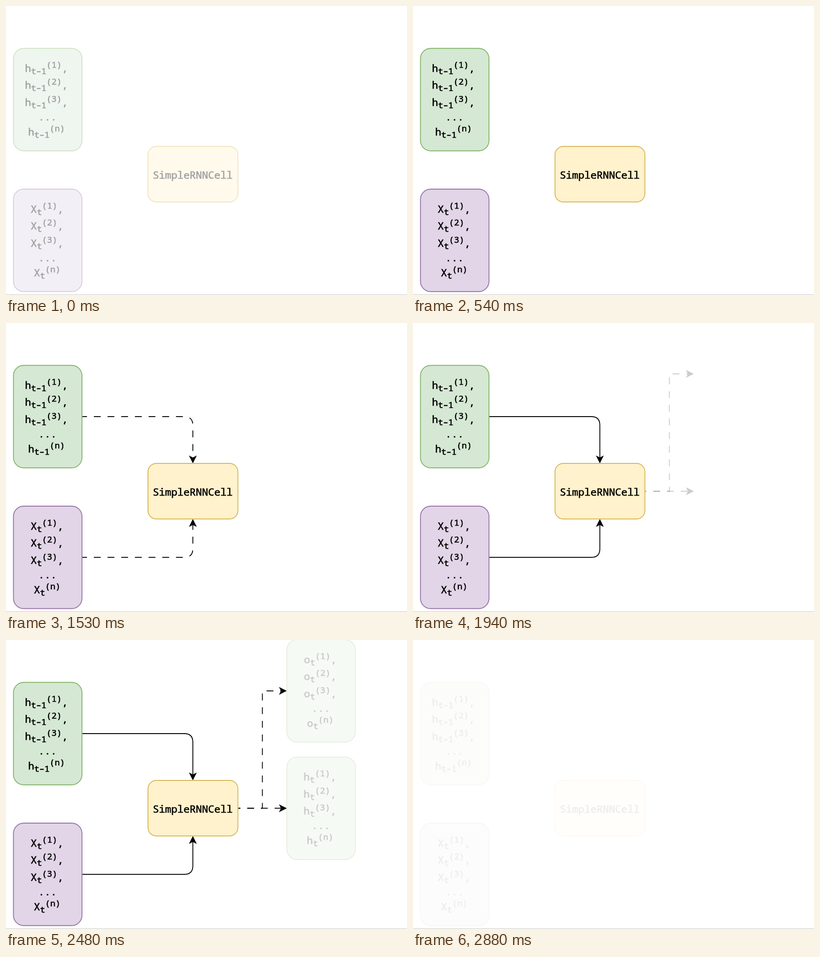
Recreate the animation shown at these times as an HTML page. Size 881x636 px, loop 2.96 s.

```html
<!DOCTYPE html>
<html lang="en">
<head>
<meta charset="utf-8">
<title>SimpleRNNCell</title>
<style>
  html, body { margin: 0; width: 100%; height: 100%; overflow: hidden; background: #fff; }
  svg { display: block; width: 881px; height: 636px; }
  text { font: 500 22.5px "Noto Sans Mono", monospace; white-space: pre; stroke: #000; stroke-width: 0.65px; }
  .small { font-size: 18.75px; }
  rect, path { stroke-width: 1.88px; }
  .line { fill: none; stroke: #000; }
  .head { fill: #000; stroke: #000; stroke-miterlimit: 10; }
</style>
</head>
<body>
<svg id="stage" viewBox="0 0 881 636"></svg>
<script>
const LOOP = 2960, STEP = 200 / 3, FADE = 1000;
const INPUTS_AT = -420, IN_ARROWS_AT = 610, SOLID_AT = 1666, OUT_ARROWS_AT = 1626, OUTPUTS_AT = 2150;
const CLEAR_AT = 2733, LABEL_AT = 2866;
const DASH = 15.04, FLOW_MS = 500;

const stage = document.getElementById('stage');

function add(parent, tag, attrs, content) {
  const node = document.createElementNS('http://www.w3.org/2000/svg', tag);
  for (const key in attrs) node.setAttribute(key, attrs[key]);
  if (content) node.textContent = content;
  parent.appendChild(node);
  return node;
}

const group = () => add(stage, 'g', {});

function box(parent, x, y, width, height, rx, fill, stroke) {
  add(parent, 'rect', { x, y, width, height, rx, fill, stroke });
}

function term(parent, x, y, letter, sub, index, tail) {
  const line = add(parent, 'text', { x, y });
  add(line, 'tspan', {}, letter);
  add(line, 'tspan', { class: 'small', dy: 5 }, sub);
  add(line, 'tspan', { class: 'small', dy: -14 }, `(${index})`);
  if (tail) add(line, 'tspan', { dy: 9 }, tail);
}

// A rounded box listing one vector: items 1, 2, 3, ... n
function vector(x, y, textX, letter, sub, fill, stroke) {
  const g = group();
  box(g, x, y, 150.5, 225.5, 22.5, fill, stroke);
  const base = y + 51.5;
  for (let i = 0; i < 3; i++) term(g, textX, base + i * 37.5, letter, sub, i + 1, ',');
  add(g, 'text', { x: x + 54.6, y: base + 107.2 }, '...');
  term(g, textX + 6.9, base + 140, letter, sub, 'n');
  return g;
}

// A connector whose head ends at (x, y) and points by angle
function arrow(d, x, y, angle) {
  const g = group();
  const line = add(g, 'path', { class: 'line', d });
  add(g, 'path', {
    class: 'head',
    d: 'M-2.1 0L-15.3 6.6L-12 0L-15.3 -6.6Z',
    transform: `translate(${x} ${y}) rotate(${angle})`
  });
  return { g, line };
}

const GREEN = ['#d5e8d4', '#82b366'], PURPLE = ['#e1d5e7', '#9673a6'];

const inArrows = [
  arrow('M167.5 206H391.7Q410.5 206 410.5 224.8V297', 410.5, 309, 90),
  arrow('M167.5 515.8H391.7Q410.5 515.8 410.5 497V443.3', 410.5, 431.3, -90)
];
const outArrows = [
  arrow('M509.5 370.3H605', 617, 370.3, 0),
  arrow('M509.5 370.3H563.3V112H605', 617, 112, 0)
];

const inputs = [
  vector(16.4, 93.3, 41.5, 'h', 't–1', ...GREEN),
  vector(16.4, 403, 54.3, 'X', 't', ...PURPLE)
];
const outputs = [
  vector(617, -0.7, 654.4, 'o', 't', ...GREEN),
  vector(617, 257.6, 653.8, 'h', 't', ...GREEN)
];

const cell = group();
box(cell, 312, 309, 197.5, 122.3, 18.3, '#fff2cc', '#d6b656');
const label = add(cell, 'text', { x: 322.5, y: 380.2 }, 'SimpleRNNCell');
add(stage, 'rect', { x: 0, y: 635, width: 881, height: 1, fill: '#c4c4c4' });

// Cubic ease-in-out with control points (.42, 0) and (.58, 1)
function ease(x) {
  if (x <= 0) return 0;
  if (x >= 1) return 1;
  let low = 0, high = 1, s = 0.5;
  for (let i = 0; i < 24; i++) {
    s = (low + high) / 2;
    const at = 1.26 * (1 - s) ** 2 * s + 1.74 * (1 - s) * s * s + s ** 3;
    if (at < x) low = s; else high = s;
  }
  return s * s * (3 - 2 * s);
}

const fade = (t, start) => ease((t - start) / FADE);
const show = (nodes, opacity) => nodes.forEach(n => n.setAttribute('opacity', opacity));

function showArrows(arrows, t, start, opacity, solid) {
  show(arrows.map(a => a.g), opacity);
  for (const { line } of arrows) {
    line.setAttribute('stroke-dasharray', solid ? 'none' : `${DASH} ${DASH}`);
    line.setAttribute('stroke-dashoffset', -2 * DASH * (t - start) / FLOW_MS);
  }
}

function draw(ms) {
  // The picture steps at 15 per second, changing up to a few ms early
  const t = Math.floor((ms % LOOP) / STEP + 0.08) * STEP;
  const cleared = t >= CLEAR_AT;
  const visible = start => cleared ? 0 : fade(t, start);

  show([...inputs, cell], cleared ? 0.065 : fade(t, INPUTS_AT));
  show([label], cleared && t < LABEL_AT ? 0.8 : 1);
  showArrows(inArrows, t, IN_ARROWS_AT, visible(IN_ARROWS_AT), t >= SOLID_AT);
  showArrows(outArrows, t, OUT_ARROWS_AT, visible(OUT_ARROWS_AT), false);
  show(outputs, visible(OUTPUTS_AT));
}

const began = performance.now();
function tick() {
  draw(performance.now() - began);
  requestAnimationFrame(tick);
}
tick();
</script>
</body>
</html>
```
